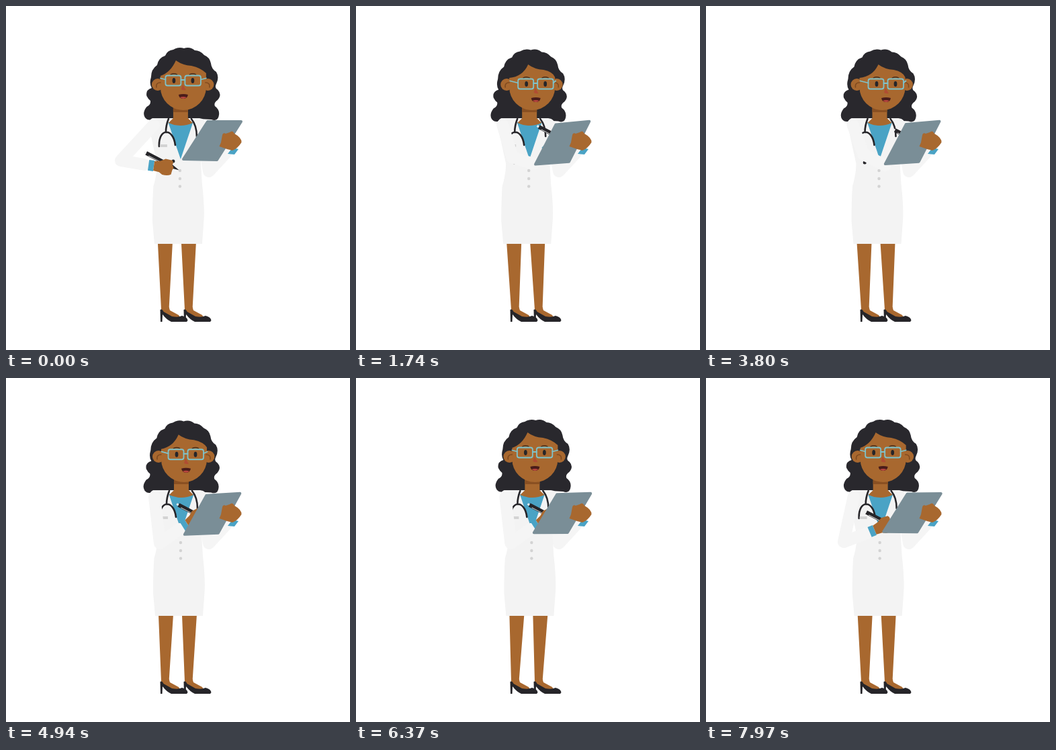
Animation of 512 by 512 pixels, one loop 8 s. Source, as an HTML page:

```html
<!DOCTYPE html>
<html lang="en">
<head>
<meta charset="utf-8">
<title>Doctor with clipboard</title>
<style>
  html, body { margin: 0; width: 100%; height: 100%; overflow: hidden; background: #fff; }
  svg { display: block; width: 100%; height: 100%; }
  .line { fill: none; stroke-linecap: round; stroke-linejoin: round; }
  .sleeve { stroke: #f5f5f5; stroke-width: 18; }
  .tube { stroke: #262529; stroke-width: 2.6; }
  .frame { stroke: #7fc3cb; stroke-width: 1.8; }
  .hair { fill: #29282d; }
  .ink { fill: #262529; }
  .skin { fill: #a8682f; }
  .shirt { fill: #4aa3c5; }
  .grey { fill: #d3d3d3; }
</style>
</head>
<body>
<svg viewBox="0 0 512 512">
  <defs>
    <g id="foot">
      <path class="skin" d="M231 448H242.500L244 453L257 460L259 463L247 464L233 456Z"/>
      <path class="ink" d="M229.500 452Q232.500 450 234.500 455L247 462Q256 464 262 461Q270 463 270.500 468L269 470H246Q239 467 233 459L232.500 470H230Z"/>
    </g>
  </defs>

  <path id="legs" class="skin"/>
  <use href="#foot"/>
  <use href="#foot" x="35"/>

  <path class="line sleeve" d="M291 180L302 246L327 219"/>
  <path class="shirt" d="M330 220L337 211L346 213L340 221Z"/>

  <g id="body">
    <path id="hair" class="hair" d="M265 63Q257 60 249 65Q240 66 237 74Q227 77 225 88Q216 94 216 106
      Q213 116 217 122Q207.500 125 209.500 134Q212 139 215 141Q216 147 209.500 150Q202.500 159 207 166Q211 171 217 169
      L250 167H271L306 169Q314 172 316.500 165Q319.500 155 311 149Q309 144 315 140Q322 132 315.500 125
      Q310 122 313 116Q318 106 313 98Q306 94 305 85Q303 76 295 73Q289 66 281 66Q274 60 265 63Z"/>
    <path fill="#f3f3f3" d="M218 167H288Q299 168 298 180L290 232L292 265Q296 300 294.500 320L292 354H221
      L218 320Q218 290 219.500 268Q225 250 225 235L213 180Q211 170 218 167Z"/>
    <path class="shirt" d="M241.500 173H278.500L260 228Z"/>
    <path class="skin" d="M249 148H271V167L278 174Q260 182 242 174L249 167Z"/>
    <path fill="#8a5022" d="M249 150H271V158H249Z"/>
    <path class="line tube" d="M242 168Q238 178 238 188M228 209C227 181 249 181 252 207M276 168Q284 178 284 194"/>
    <rect class="grey" x="229" y="206" width="11" height="4"/>
    <circle class="ink" cx="237.700" cy="233" r="2.500"/>
    <g class="grey">
      <circle cx="259" cy="245" r="2.200"/><circle cx="259" cy="257" r="2.200"/><circle cx="259" cy="268.500" r="2.200"/>
    </g>

    <g class="skin">
      <circle cx="226" cy="117" r="9"/><circle cx="300.500" cy="117" r="9"/>
      <path id="face"/>
    </g>
    <path class="line" stroke="#7f4a1f" stroke-width="1.600" d="M224 121Q223 114 230 114M303 121Q304 114 297 114"/>
    <g id="features">
      <path class="line" stroke="#4a2f1c" stroke-width="1.600" d="M245.500 102Q250 99.500 254.500 102M273.500 102Q278 99.500 282.500 102"/>
      <g class="ink"><ellipse cx="250" cy="111" rx="2.400" ry="4"/><ellipse cx="278" cy="111" rx="2.400" ry="4"/></g>
      <path fill="#b04d33" d="M263 117L268 125Q264 126 261 124Z"/>
      <path fill="#4a1c1a" d="M257 132Q264 130 271 132Q270 138 264 138Q258 138 257 132Z"/>
      <path fill="#b8463f" d="M259 136Q264 134 269 136Q264 140 259 136Z"/>
      <g class="line frame">
        <rect x="237.500" y="103.500" width="23" height="15" rx="3"/>
        <rect x="266.500" y="103.500" width="23.500" height="15" rx="3"/>
        <path d="M260.500 110H266.500"/>
      </g>
    </g>
    <path id="temples" class="line frame"/>

    <path id="sleeve" class="line sleeve"/>
    <g id="hand">
      <g transform="rotate(27.500 -27 -22)">
        <path class="ink" d="M-25 -25H17L30 -22L17 -19H-25Z"/>
        <path fill="#eee" d="M-28 -23.500H-25V-20.500H-28ZM-20 -20.500H10V-19.700H-20Z"/>
      </g>
      <circle class="ink" cx="15" cy="-9" r="2.500"/>
      <g id="grip">
        <path class="shirt" d="M-22 -8H-14V8H-22Z"/>
        <path class="skin" d="M-14 -7L-5 -9L2 -13L12 -12Q15 -9 13 -5Q17 -2 14 2L13 9Q8 12 0 11L-5 8L-14 7Z"/>
      </g>
    </g>
  </g>

  <path id="board" class="line" style="fill:#7a8e97" stroke="#7a8e97" stroke-width="4" d="M300 172L350 172L314 229L264 228Z"/>
  <path class="skin" d="M317.500 209L320 203L322 192Q323 188 327 190L333 188Q337 184 340 190Q351 196 350.500 203Q345 212 337 215L329 213Z"/>
</svg>

<script>
const LOOP = 8000;
const $ = id => document.getElementById(id);
const draw = (id, d) => $(id).setAttribute('d', d);
const place = (id, transform) => $(id).setAttribute('transform', transform);

// Eased interpolation between [time, ...values] keys.
function keyed(keys, t) {
  const i = Math.max(1, keys.findIndex(k => k[0] >= t));
  const a = keys[i - 1], b = keys[i];
  const u = (t - a[0]) / (b[0] - a[0]);
  const s = u * u * (3 - 2 * u);
  return a.slice(1).map((v, n) => v + (b[n + 1] - v) * s);
}

const nod = [[0, 0], [450, 0], [1450, 1], [4500, 1], [5450, 0], [LOOP, 0]];
const tilt = [[0, 0], [350, 0], [1450, 1], [4400, .92], [5500, .33], [6370, .3], [LOOP, .1]];

// Elbow, hand and end of the sleeve.
const writing = [228, 246, 281, 210, 257, 225];
const raised = [236, 221, 303, 199, 268, 237];
const lowered = [236, 221, 308, 206, 268, 237];
const arm = [
  [0, 171, 230, 234, 240, 206, 236], [650, ...writing], [1300, ...writing],
  [1900, ...raised], [3300, ...raised], [3800, ...lowered], [4250, ...lowered],
  [4800, ...writing], [7500, ...writing], [LOOP, 205, 244, 264, 221, 240, 231]
];

function render(t) {
  const sway = .2 + 2.5 * Math.sin(2 * Math.PI * (t - 40) / 2000);
  const [h] = keyed(nod, t);
  const [r] = keyed(tilt, t);
  const [ex, ey, hx, hy, cx, cy] = keyed(arm, t);

  place('body', `translate(${sway} 0)`);
  draw('legs', `M${226 + sway} 352H${248 + sway}L242.5 452H231ZM${261 + sway} 352H${283 + sway}L277.5 452H266Z`);

  place('hair', `translate(${-3 * h} ${2.5 * h})`);
  const px = 253 + 5 * h, py = 81 + 6 * h;
  draw('face', `M230 ${104 + 3 * h}Q${px - 8} ${py + 18} ${px} ${py}Q${px + 9} ${py + 7} ${px + 23} ${py + 8}` +
    `Q${px + 37} ${py + 11} 298 ${100 + 6 * h}V121A34 34 0 0 1 230 121Z`);
  place('features', `translate(${5.5 * h} ${5 * h})`);
  draw('temples', `M${230 + h} ${107.5 + 4 * h}L${237.5 + 5.5 * h} ${109.5 + 5 * h}` +
    `M${290 + 5.5 * h} ${109.5 + 5 * h}L${298 + h} ${107.5 + 4 * h}`);

  draw('sleeve', `M220 177L${ex} ${ey}L${cx} ${cy}`);
  place('hand', `translate(${hx} ${hy})`);
  place('grip', `rotate(${Math.atan2(hy - cy, hx - cx) * 180 / Math.PI})`);
  place('board', `rotate(${-5.5 * r} 345 200)`);
}

const start = performance.now();
function tick() {
  render((performance.now() - start) % LOOP);
  requestAnimationFrame(tick);
}
tick();
</script>
</body>
</html>
```
